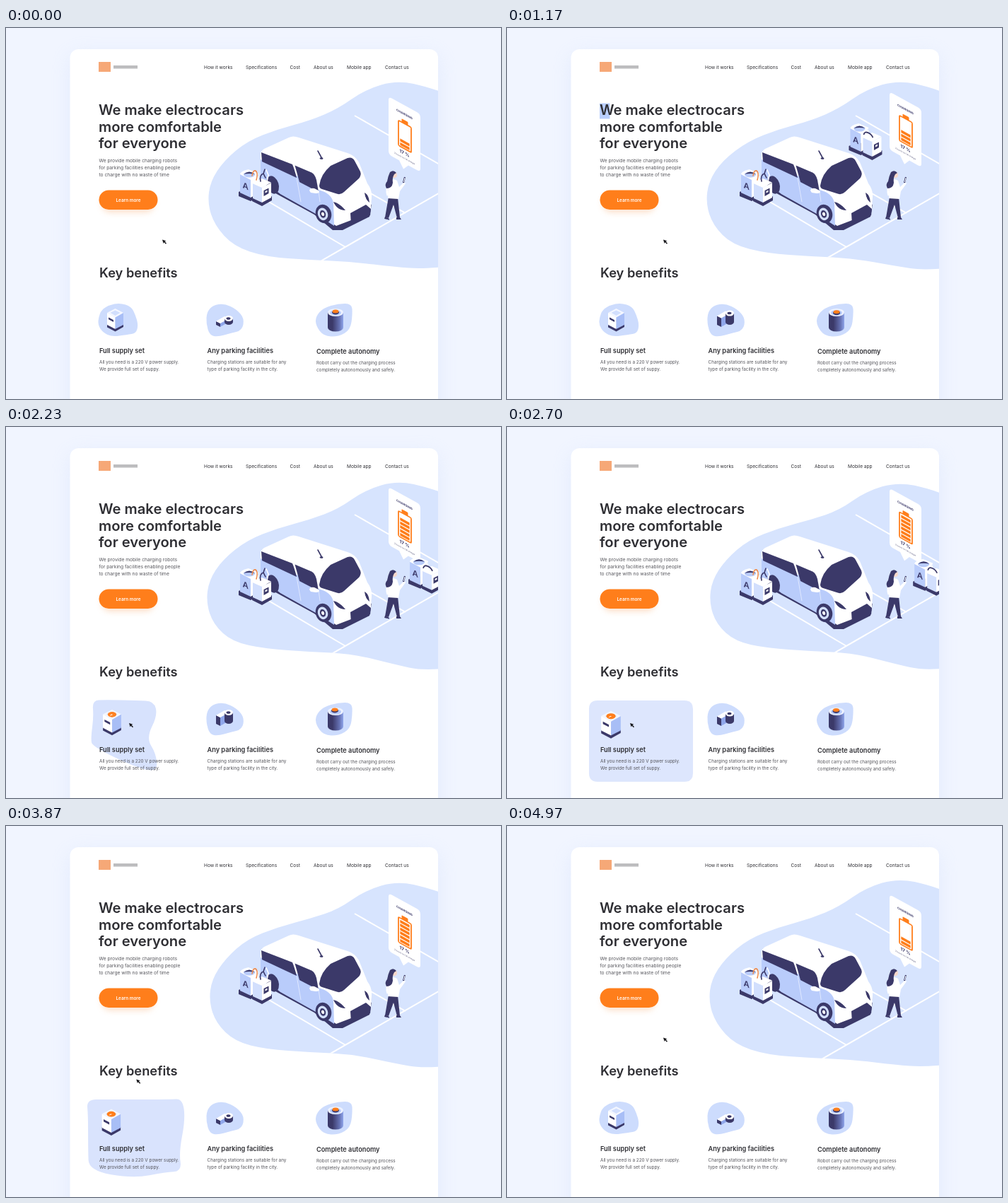
An HTML page for the animation above (5.01 s loop, 700 by 525 pixels).

```html
<!DOCTYPE html>
<html lang="en">
<head>
<meta charset="utf-8">
<title>Charging robots</title>
<style>
  html, body { margin: 0; width: 100%; height: 100%; overflow: hidden; background: #f1f5ff; }
  svg { display: block; width: 100vw; height: 100vh; font-family: Inter, "Open Sans", sans-serif; }
  text { fill: #2f2f34; }
  .nav { font-size: 6.6px; }
  .h1 { font-size: 20.2px; font-weight: 600; }
  .h2 { font-size: 18.3px; font-weight: 600; }
  .h3 { font-size: 9.2px; font-weight: 600; }
  .lead { font-size: 6.7px; fill: #55555b; }
  .note { font-size: 6.35px; fill: #55555b; }
  .lead text, .note text { fill: inherit; }
  .navy { fill: #3b3969; }
  .blue { fill: #b9ccfb; }
  .pale { fill: #d2dffd; }
  .white { fill: #fff; }
  .orange { fill: #ff7e1b; }
  .patch { fill: #cddcfd; }
</style>
</head>
<body>
<svg viewBox="0 0 700 525" preserveAspectRatio="none">
  <defs>
    <filter id="soft" x="-20%" y="-20%" width="140%" height="140%"><feGaussianBlur stdDeviation="14"/></filter>
    <filter id="glow" x="-20%" y="-60%" width="140%" height="240%"><feGaussianBlur stdDeviation="4"/></filter>
    <clipPath id="page"><rect x="91" y="30" width="520" height="520" rx="12"/></clipPath>
    <clipPath id="ground"><path class="hero"/></clipPath>
    <linearGradient id="drum"><stop offset=".3" stop-color="#3b3969"/><stop offset=".75" stop-color="#6672b4"/><stop offset="1" stop-color="#8fa5ea"/></linearGradient>

    <g id="robot">
      <path class="navy" d="M329 232L342 226L358 233V238L346 245L329 238Z"/>
      <path class="blue" d="M331 207L346 214V240L331 233Z"/>
      <path class="white" d="M346 214L357 209V234L346 240Z"/>
      <path class="white" d="M331 207Q331 203 343 200L357 206Q357 210 346 215Z"/>
      <ellipse cx="344" cy="207.500" rx="8" ry="4" class="blue"/>
      <path class="navy" d="M336 207Q344 200 352 207Q344 205 336 207Z"/>
      <text transform="matrix(1 .42 0 1 334.500 226)" font-size="11.500" font-weight="600" style="fill:#3b3969">A</text>
      <path class="navy" d="M348 240L362 246L376 238V244L362 252L348 245Z"/>
      <path class="pale" d="M349 220L362 226V247L349 241Z"/>
      <path class="white" d="M362 226L375 219V240L362 247Z"/>
      <path class="white" d="M349 220L362 213L375 218.500L362 226Z"/>
      <path class="navy" d="M364.500 230L371.500 226.500V234L364.500 238Z"/>
      <path class="white" d="M366.500 231L369.500 229.500V232L366.500 233.500Z"/>
    </g>
  </defs>

  <rect width="700" height="525" fill="#f1f5ff"/>
  <rect x="91" y="38" width="520" height="520" rx="12" fill="#cbdafa" opacity=".4" filter="url(#soft)"/>
  <rect x="90.500" y="30" width="520.500" height="520" rx="12" fill="#fff"/>

  <rect x="131" y="48" width="17" height="14" fill="#f6a877"/>
  <rect x="152" y="53" width="34" height="4.500" fill="#bdbdbf"/>
  <g class="nav">
    <text x="280" y="58">How it works</text><text x="339" y="58">Specifications</text>
    <text x="401.500" y="58">Cost</text><text x="435" y="58">About us</text>
    <text x="482" y="58">Mobile app</text><text x="536" y="58">Contact us</text>
  </g>

  <g clip-path="url(#page)">
    <path class="hero" fill="#d7e4fe"/>
    <g clip-path="url(#ground)">
      <path d="M493 124L613 193M365 242L480 310M425 341.500L615 232M505 228L565 262" fill="none" stroke="#fff" stroke-width="2"/>
    </g>

    <g id="van">
      <path class="navy" d="M364 205L374 230L436 264L462 286L476 286L514 267L517 250L430 215Z"/>
      <path class="white" d="M360 179Q360 174 365 171L400 155Q406 152 414 155L483 177Q493 180 499 190L511 220Q518 229 517 240L516 257L488 272L467 280L360 212Z"/>
      <path class="blue" d="M360 186L408 207L442 229Q461 234 463 248L464 280L438 263L388 235L360 213Z"/>
      <ellipse cx="377" cy="222" rx="8.500" ry="13" class="navy" transform="rotate(-18 377 222)"/>
      <path class="navy" d="M361 176L405 193Q408 200 411 212L362 189Z"/>
      <path class="navy" d="M408.500 194.500L432 204.500Q437 207 439 215L442 232L415 218Z"/>
      <path d="M411 212L417 246M442 231L444 246" fill="none" stroke="#dfe8ff"/>
      <path class="navy" d="M443 223Q445 207 459 195L483 184Q490 182 493 188L501 203Q503 208 499 213L478 232Q473 237 466 234L447 228Q443 227 443 223Z"/>
      <path class="navy" d="M463 246Q472 248 480 258Q468 258 463 246ZM507 233Q513 236 514 247Q508 243 507 233Z"/>
      <path class="navy" d="M487 262L509 250L516 256L515 265L488 278Z"/>
      <path class="white" d="M429 230Q430 226 436 227L442 230Q445 234 438 234L431 233Z"/>
      <path d="M447 185L441 174" stroke="#3b3969" stroke-width="1.600" stroke-linecap="round"/>
      <ellipse cx="446" cy="184.500" rx="2.500" ry="1.300" class="navy"/>
      <g transform="rotate(-18 449 263)">
        <ellipse cx="449" cy="263" rx="11" ry="13.500" class="navy"/>
        <ellipse cx="448" cy="263" rx="7" ry="9" class="pale"/>
        <ellipse cx="448" cy="263" rx="4" ry="5.500" class="navy"/>
        <ellipse cx="448" cy="263" rx="2" ry="2.800" class="white"/>
      </g>
    </g>

    <use href="#robot"/>
    <g fill="none" stroke-width="1.600" stroke-linecap="round">
      <path d="M348 209Q349 201 353 202Q357 205 354 215" stroke="#f08b4a"/>
      <path d="M360 217Q358 208 364 206L367 212M364 206L366 200" stroke="#3b3969"/>
      <path d="M368 201L371 208L369 217" stroke="#fff"/>
    </g>

    <g id="panel">
      <g transform="matrix(1 .55 0 1 541 97)">
        <path class="white" d="M5 0H40Q45 0 45 5V77Q45 82 40 82H28L21 91L15 82H5Q0 82 0 77V5Q0 0 5 0Z"/>
        <g text-anchor="middle">
          <text x="22.500" y="14" font-size="4.200" font-weight="700" style="fill:#3b3969">CHARGING</text>
          <text x="22.500" y="70" font-size="6.200" font-weight="700" style="fill:#3b3969">17 %</text>
          <text x="22.500" y="76" font-size="2.900" style="fill:#55557a">2 hours to full charge</text>
        </g>
        <rect x="18.500" y="21" width="9" height="5" rx="1" class="orange"/>
        <rect x="14" y="26" width="18" height="35.500" rx="1.500" fill="#fff" stroke="#ff7e1b" stroke-width="1.800"/>
        <g id="bars" class="orange"></g>
      </g>
    </g>

    <g id="rover">
      <use href="#robot"/>
      <path d="M350 216Q351 211 356 213T363 220" fill="none" stroke="#3b3969" stroke-width="1.800"/>
    </g>

    <g id="person">
      <path class="navy" d="M541 239L554 240L557 268L553 269L548 250L541 269L536 268Z"/>
      <path class="navy" d="M536 267L542 270V271.500L535 270ZM552 268L557 268L559 271H552Z"/>
      <path class="white" d="M541 216Q547 212 553 216L556 225L563 218L565 220L557 231L555 242L540 241Z"/>
      <path d="M542 219Q537 228 540 237" fill="none" stroke="#fff" stroke-width="3"/>
      <circle cx="549" cy="208" r="4" fill="#f7d9cc"/>
      <path class="navy" d="M552 205Q548 200 543 204Q540 210 539 217Q535 221 538 227Q546 227 547 219Q546 212 549 207Z"/>
      <path d="M564 211L562 219" stroke="#3b3969" stroke-width="2.200"/>
      <path d="M564 212L562.500 218" stroke="#fff" stroke-width="1"/>
    </g>

    <g clip-path="url(#ground)">
      <g id="visitor">
        <path class="blue" d="M540 345V332Q541 322 547 313L564 283Q570 272 582 270L612 283L610 380L560 365Z"/>
        <path class="white" d="M571 275Q578 265 590 260L650 232Q662 228 672 234L712 258Q716 262 715 300L612 375L588 342Q586 322 606 316L613 298Q600 284 571 275Z"/>
        <path class="navy" d="M561 297Q566 284 576 277Q594 278 610 290Q614 294 612 300L607 316Q588 305 561 303Z"/>
        <path class="navy" d="M616 300L640 286V306L614 322ZM645 284L706 255V270L645 303Z"/>
        <path class="navy" d="M541 327Q547 328 551 336Q543 338 541 327ZM574 341Q584 341 589 351Q578 351 574 341Z"/>
        <ellipse cx="606" cy="348" rx="11" ry="14" class="navy"/>
        <ellipse cx="607" cy="348" rx="6" ry="8" class="pale"/>
      </g>
    </g>
  </g>

  <rect id="mark1" y="106.500" height="22" fill="#b9cefd"/>
  <rect id="mark2" y="153.500" height="22" fill="#ffa468"/>
  <g class="h1">
    <text x="131" y="123">We make electrocars</text>
    <text x="131" y="146.500">more comfortable</text>
    <text x="131" y="170">for everyone</text>
  </g>
  <g class="lead">
    <text x="131.500" y="190">We provide mobile charging robots</text>
    <text x="131.500" y="200">for parking facilities enabling people</text>
    <text x="131.500" y="210">to charge with no waste of time</text>
  </g>
  <rect x="135" y="236" width="75" height="25" rx="12.500" fill="#f6b27e" opacity=".4" filter="url(#glow)"/>
  <rect x="131.500" y="229.500" width="83" height="27.500" rx="13.750" class="orange"/>
  <text x="173" y="245.500" text-anchor="middle" font-size="6.400" font-weight="600" style="fill:#fff">Learn more</text>

  <text class="h2" x="132" y="353">Key benefits</text>

  <path id="tile"/>
  <path class="patch" id="patch2"/>
  <path class="patch" id="patch3"/>

  <g id="unit">
    <path class="navy" d="M-11.500 6L0 12L11.500 6V10L0 16.500L-11.500 10.500Z"/>
    <path class="white" d="M-11.500 -10L0 -3.500V13L-11.500 7Z"/>
    <path fill="#a8bef6" d="M0 -3.500L11.500 -10V7L0 13Z"/>
    <path fill="#f4f7ff" d="M0 -16L11.500 -10L0 -3.500L-11.500 -10Z"/>
    <path class="pale" d="M0 -13.500L7 -10L0 -6L-7 -10Z"/>
    <path class="navy" d="M-9.500 -3.500L-2.500 .2V3L-9.500 -.7Z"/>
    <g id="lid">
      <ellipse cy="-9.800" rx="5.500" ry="3.400" class="orange"/>
      <path class="white" d="M-3 -8Q-1 -11 1 -9.500Q-1 -9 -3 -8Z"/>
    </g>
  </g>

  <g id="station">
    <path class="navy" id="stationLeft"/>
    <path fill="#8fa6ea" id="stationRight"/>
    <path class="white" id="stationTop"/>
    <path class="navy" id="ringSide"/>
    <g id="ringTop">
      <ellipse cx="315" cy="412" rx="6" ry="4" class="white"/>
      <ellipse cx="314.500" cy="412" rx="3" ry="1.800" class="navy"/>
    </g>
  </g>

  <path d="M455 402V424A11 5.500 0 0 0 477 424V402Z" fill="url(#drum)"/>
  <ellipse cx="466" cy="402.500" rx="11" ry="5.500" fill="#edf2ff"/>
  <ellipse cx="466" cy="403" rx="8" ry="3.800" class="blue"/>
  <g id="cap">
    <ellipse cx="466" cy="402.500" rx="5" ry="3" class="navy"/>
    <ellipse cx="466" cy="401" rx="4.500" ry="2.500" class="orange"/>
  </g>

  <g class="h3">
    <text x="132" y="460">Full supply set</text>
    <text x="284.500" y="460">Any parking facilities</text>
    <text x="439" y="460.500">Complete autonomy</text>
  </g>
  <g class="note">
    <text x="132" y="475">All you need is a 220 V power supply.</text><text x="132" y="485">We provide full set of suppy.</text>
    <text x="284.500" y="475">Charging stations are suitable for any</text><text x="284.500" y="485">type of parking facility in the city.</text>
    <text x="439" y="475.500">Robot carry out the charging process</text><text x="439" y="485.500">completely autonomously and safely.</text>
  </g>

  <path id="cursor" d="M0 0L5.300 1.800L3.600 2.800L6 5.200L4.900 6.200L2.600 3.800L1.600 5.500Z" fill="#18181c"/>
</svg>

<script>
const LOOP = 5010;
const KNOTS = [0, 770, 1570, 2230, 3130, 3870];
const $ = id => document.getElementById(id);
const clamp = v => Math.min(1, Math.max(0, v));
const span = (t, from, to) => clamp((t - from) / (to - from));
const mix = (a, b, u) => a + (b - a) * u;
const inOut = u => u < .5 ? 4 * u ** 3 : 1 - 4 * (1 - u) ** 3;
const move = (el, x, y, extra = '') => el.setAttribute('transform', `translate(${x} ${y}) ${extra}`);

// Smooth periodic curve through one value per knot
function wave(t, values) {
  const n = KNOTS.length;
  const time = j => KNOTS[(j + n) % n] + LOOP * Math.floor(j / n);
  const value = j => values[(j + n) % n];
  const slope = j => (value(j + 1) - value(j - 1)) / (time(j + 1) - time(j - 1));
  let i = n - 1;
  while (KNOTS[i] > t) i--;
  const d = time(i + 1) - time(i), u = (t - time(i)) / d, e = u * u * (3 - 2 * u);
  return mix(value(i), value(i + 1), e)
    + d * u * (1 - u) * ((1 - u) * slope(i) - u * slope(i + 1));
}

// Closed quadratic curve steered by its control points
function blob(points) {
  const half = (a, b) => `${((a[0] + b[0]) / 2).toFixed(2)} ${((a[1] + b[1]) / 2).toFixed(2)}`;
  const next = i => points[(i + 1) % points.length];
  return 'M' + half(points[points.length - 1], points[0])
    + points.map((p, i) => `Q${p[0].toFixed(2)} ${p[1].toFixed(2)} ${half(p, next(i))}`).join('') + 'Z';
}

const HERO = [[660, 108], [600, 84], [553, 74], [508, 87], [470, 114], [430, 131], [385, 143],
  [341, 160], [308, 188], [289, 217], [285, 248], [295, 279], [322, 309], [368, 324],
  [430, 328], [490, 331], [550, 338], [590, 341], [660, 334]];

const REST = [[131, 409], [135, 399], [146, 392], [161, 389], [177, 394], [183, 406],
  [187, 420], [184, 432], [171, 434], [150, 437], [137, 431], [130, 420]];
const OPENING = [[124, 410], [122, 387], [140, 386], [185, 387], [209, 388], [214, 408],
  [198, 440], [212, 462], [214, 488], [185, 482], [122, 452], [120, 440]];
const CARD = [[116, 411], [116, 387], [140, 387], [239, 387], [263, 387], [263, 411],
  [263, 478], [263, 502], [239, 502], [140, 502], [116, 502], [116, 478]];
const CLOSING = [[116, 410], [114, 387], [140, 387], [232, 387], [250, 386], [254, 415],
  [245, 462], [249, 489], [226, 490], [180, 499], [117, 488], [116, 458]];
const SHAPES = [REST, OPENING, CARD, CLOSING, REST];
const HOVER = [0, .6, 1, .75, 0];

$('patch2').setAttribute('d', blob([[284, 402], [293, 392], [309, 390], [326, 398], [337, 411],
  [334, 428], [317, 432], [300, 437], [288, 435], [283, 418]]));
$('patch3').setAttribute('d', blob([[438, 408], [449, 396], [470, 390], [489, 390], [490, 405],
  [487, 427], [470, 437], [449, 436], [438, 421]]));

const bars = Array.from({ length: 6 }, (_, i) => {
  const bar = document.createElementNS('http://www.w3.org/2000/svg', 'rect');
  for (const [k, v] of Object.entries({ x: 16.3, y: 55.7 - i * 5.4, width: 13.4, height: 4 })) bar.setAttribute(k, v);
  return $('bars').appendChild(bar);
});

function drawHero(t) {
  const left = wave(t, [0, -2, -5, -2, 3, 2]);
  const top = wave(t, [0, 0, 0, 2, 5, 4]);
  const middle = wave(t, [0, -4, -6, -10, -11, -8]);
  const right = wave(t, [0, 1, 3, 4, 3, 2]);
  const d = blob(HERO.map(([x, y], i) => {
    if (i < 5) return [x, y + top];
    if (i >= 8 && i <= 12) return [x + left, y + (i === 12 ? middle / 2 : 0)];
    if (i >= 13 && i <= 15) return [x, y + middle];
    return [x, y + (i === 16 ? (right + middle) / 3 : i > 16 ? right : 0)];
  }));
  document.querySelectorAll('.hero').forEach(path => path.setAttribute('d', d));
}

function drawTraffic(t) {
  const x = wave(t, [80, 114, 197, 240, 252, 310]);
  move($('rover'), x, -88 + (x - 114) * .57);
  $('rover').setAttribute('opacity', t < 3800 ? span(t, 420, 620) : 0);

  const drive = t - 3130;
  move($('visitor'), -.3 * drive, .173 * drive);
  $('visitor').style.display = t > 2700 && t < 3860 ? '' : 'none';
}

function drawBattery(t) {
  move($('panel'), 0, wave(t, [0, -2.5, -11, -12, -8, -2]));
  const level = t < 4300 ? Math.min(6, 2 + Math.floor((t + 200) / 700)) : Math.max(2, 5 - Math.floor((t - 4300) / 130));
  bars.forEach((bar, i) => bar.style.display = i < level ? '' : 'none');
}

function drawMark(el, t, start, from, to) {
  const edge = delay => mix(from, to, inOut(span(t, start + delay, start + delay + 760)));
  el.setAttribute('x', edge(200));
  el.setAttribute('width', edge(0) - edge(200));
}

function drawTile(t) {
  const marks = [2080, 2230, 2560, 3720, 3870, 4220];
  const opening = t < marks[3];
  const base = opening ? 0 : 2, k = opening ? 0 : 3;
  const late = t > marks[k + 1];
  const i = base + (late ? 1 : 0);
  const raw = late ? span(t, marks[k + 1], marks[k + 2]) : span(t, marks[k], marks[k + 1]);
  const u = late ? 1 - (1 - raw) ** 2 : raw ** 1.4;
  const hover = mix(HOVER[i], HOVER[i + 1], u);
  $('tile').setAttribute('d', blob(SHAPES[i].map(([x, y], n) =>
    [mix(x, SHAPES[i + 1][n][0], u), mix(y, SHAPES[i + 1][n][1], u)])));
  $('tile').setAttribute('fill', `rgb(${mix(205, 221, hover)},${mix(220, 230, hover)},253)`);
  move($('unit'), mix(154.5, 147, hover), mix(413, 421, hover), `scale(${mix(1, 1.2, hover)})`);
  $('lid').setAttribute('opacity', clamp(hover * 1.6));
}

function drawStation(t) {
  const h = wave(t, [1, 6, 10, 8, 5, 2]);
  $('stationLeft').setAttribute('d', `M297 ${416 - h}L303 ${419 - h}V423L297 420Z`);
  $('stationRight').setAttribute('d', `M303 ${419 - h}L315 ${412 - h}V416L303 423Z`);
  $('stationTop').setAttribute('d', `M297 ${416 - h}L309 ${409 - h}L315 ${412 - h}L303 ${419 - h}Z`);
  $('ringSide').setAttribute('d', `M309 ${412 - h}V416A6 4 0 0 0 321 416V${412 - h}Z`);
  move($('ringTop'), 0, -h);
  move($('cap'), wave(t, [0, 0, 0, -1, 0, 0]), wave(t, [0, .5, .5, -1, 0, 0]));
}

function drawCursor(t) {
  const u = inOut(span(t, 1680, 2140)) - inOut(span(t, 3600, 4140));
  const bend = (a, b, c) => a * (1 - u) ** 2 + 2 * b * u * (1 - u) + c * u * u;
  move($('cursor'), bend(221, 170.5, 174), bend(299.500, 359, 419));
}

function draw(t) {
  drawHero(t);
  drawTraffic(t);
  drawBattery(t);
  drawMark($('mark1'), t, 973, 131, 335);
  drawMark($('mark2'), t, 2654, 131, 252);
  drawTile(t);
  drawStation(t);
  drawCursor(t);
}

const start = performance.now();
function tick() {
  draw((performance.now() - start) % LOOP);
  requestAnimationFrame(tick);
}
tick();
</script>
</body>
</html>
```
